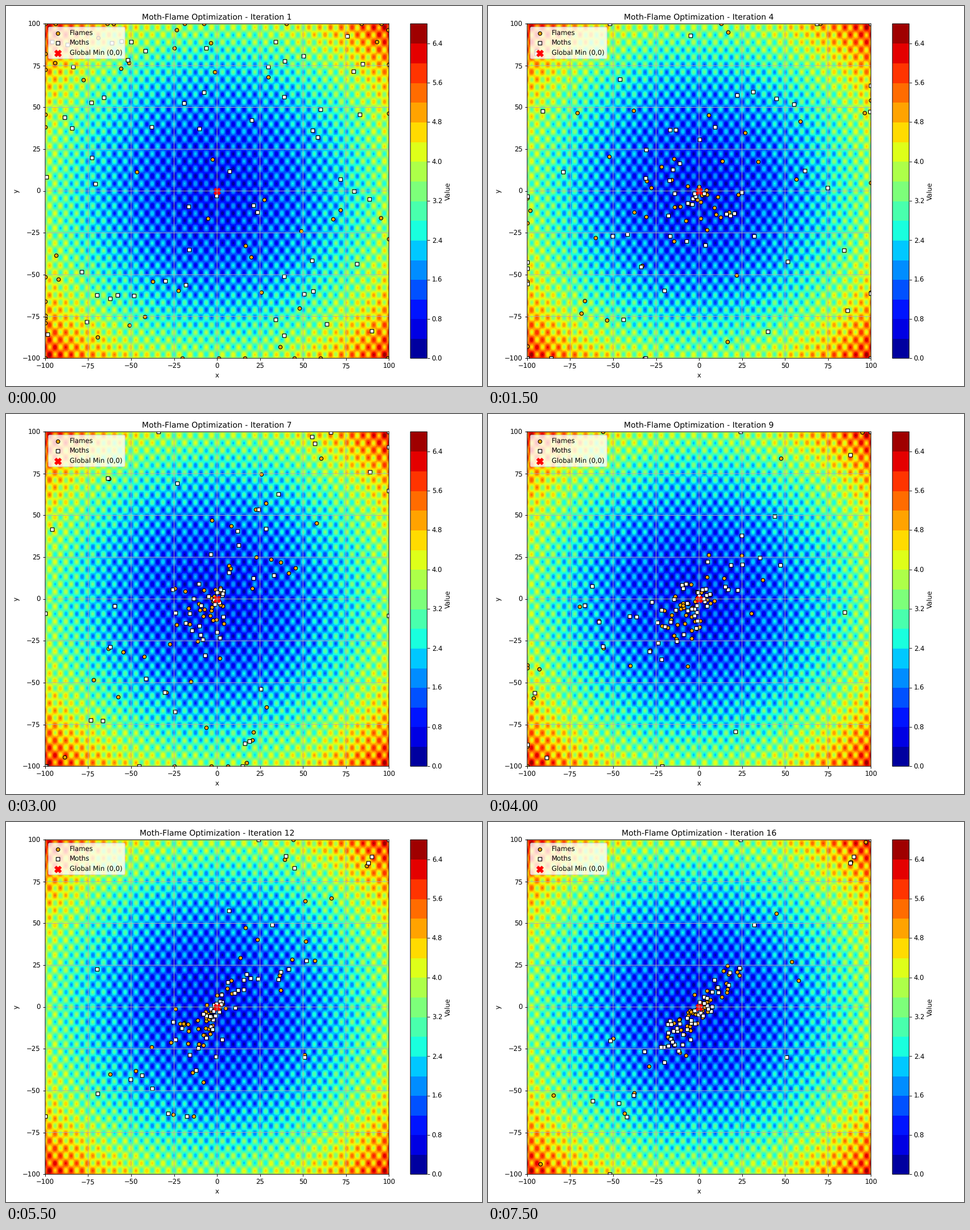
Animation of 837 by 669 pixels, one loop 8 s. Source, as a matplotlib script:

```python
import numpy as np
import matplotlib.pyplot as plt
from matplotlib.animation import FuncAnimation

WIDTH, HEIGHT, DPI = 837, 669, 83.7
STEPS, INTERVAL = 16, 500
COUNT, LIMIT = 60, 100

# Moths that get stuck, one more with each late step
STUCK = [(100, 100), (24, 100), (88, 86), (90, 90),
         (51, -30), (32, 49), (-62, -56)]

rng = np.random.default_rng(12)


def clip(points):
    return np.clip(points, -LIMIT, LIMIT)


def swarm(step):
    """Dense core near the origin plus a wide diagonal cloud that tightens."""
    radius = 80 * 0.93 ** step * rng.lognormal(0, 0.8, COUNT)
    radius *= np.where(rng.random(COUNT) < 0.55, -1, 1)
    angle = np.radians(47) + rng.normal(0, 1.3 * 0.9 ** step, COUNT)
    core = rng.random(COUNT) < min(0.5, 0.06 * step)
    radius[core] = rng.uniform(-26, 7, core.sum())
    direction = np.column_stack([np.cos(angle), np.sin(angle)])
    return direction * radius[:, None] + rng.normal(0, 2, (COUNT, 2))


def simulate():
    moths = rng.uniform(-LIMIT, LIMIT, (COUNT, 2))
    flames = clip(rng.uniform(-125, 125, (COUNT, 2)))
    poses = [(flames, moths)]
    for step in range(2, STEPS + 1):
        moths = flames.copy()
        stuck = STUCK[:max(0, step - 6)]
        moths[:len(stuck)] = np.reshape(stuck, (-1, 2))
        near = rng.random((COUNT, 1)) < 0.2
        close = moths + rng.normal(0, 2, (COUNT, 2))
        flames = clip(np.where(near, close, swarm(step)))
        poses.append((flames, moths))
    return poses


def griewank(x, y):
    return 1 + (x**2 + y**2) / 4000 - np.cos(x) * np.cos(y / np.sqrt(2))


poses = simulate()

plt.rcParams.update({"font.family": "DejaVu Sans", "path.snap": False})
fig, ax = plt.subplots(figsize=(10, 8), dpi=100)

axis = np.linspace(-LIMIT, LIMIT, 400)
X, Y = np.meshgrid(axis, axis)
Z = griewank(X, Y)
# The smooth pass lies on a hard-edged one so that no seams show
for smooth in (False, True):
    field = ax.contourf(X, Y, Z, levels=np.arange(18) * 0.4, cmap="jet",
                        antialiased=smooth)
fig.colorbar(field, ax=ax, label="Value")

flame_dots = ax.scatter(*poses[0][0].T, s=30, c="orange", edgecolors="black",
                        label="Flames")
moth_dots = ax.scatter(*poses[0][1].T, s=30, c="white", marker="s",
                       edgecolors="black", label="Moths")
ax.scatter(0, 0, s=100, c="red", marker="X", label="Global Min (0,0)")

ax.set(xlim=(-LIMIT, LIMIT), ylim=(-LIMIT, LIMIT), xlabel="x", ylabel="y")
title = ax.set_title("Moth-Flame Optimization - Iteration 1")
ax.grid(True)
ax.legend(loc="upper left")

# Lay out at full size, then scale the figure down to the stage
fig.tight_layout()
plt.rcParams["text.hinting"] = "none"
fig.set_dpi(DPI)
fig.set_size_inches((WIDTH + 0.01) / DPI, (HEIGHT + 0.01) / DPI)


def update(i):
    flames, moths = poses[i]
    flame_dots.set_offsets(flames)
    moth_dots.set_offsets(moths)
    title.set_text(f"Moth-Flame Optimization - Iteration {i + 1}")
    return flame_dots, moth_dots, title


anim = FuncAnimation(fig, update, frames=STEPS, interval=INTERVAL, repeat=True)
plt.show()
```
